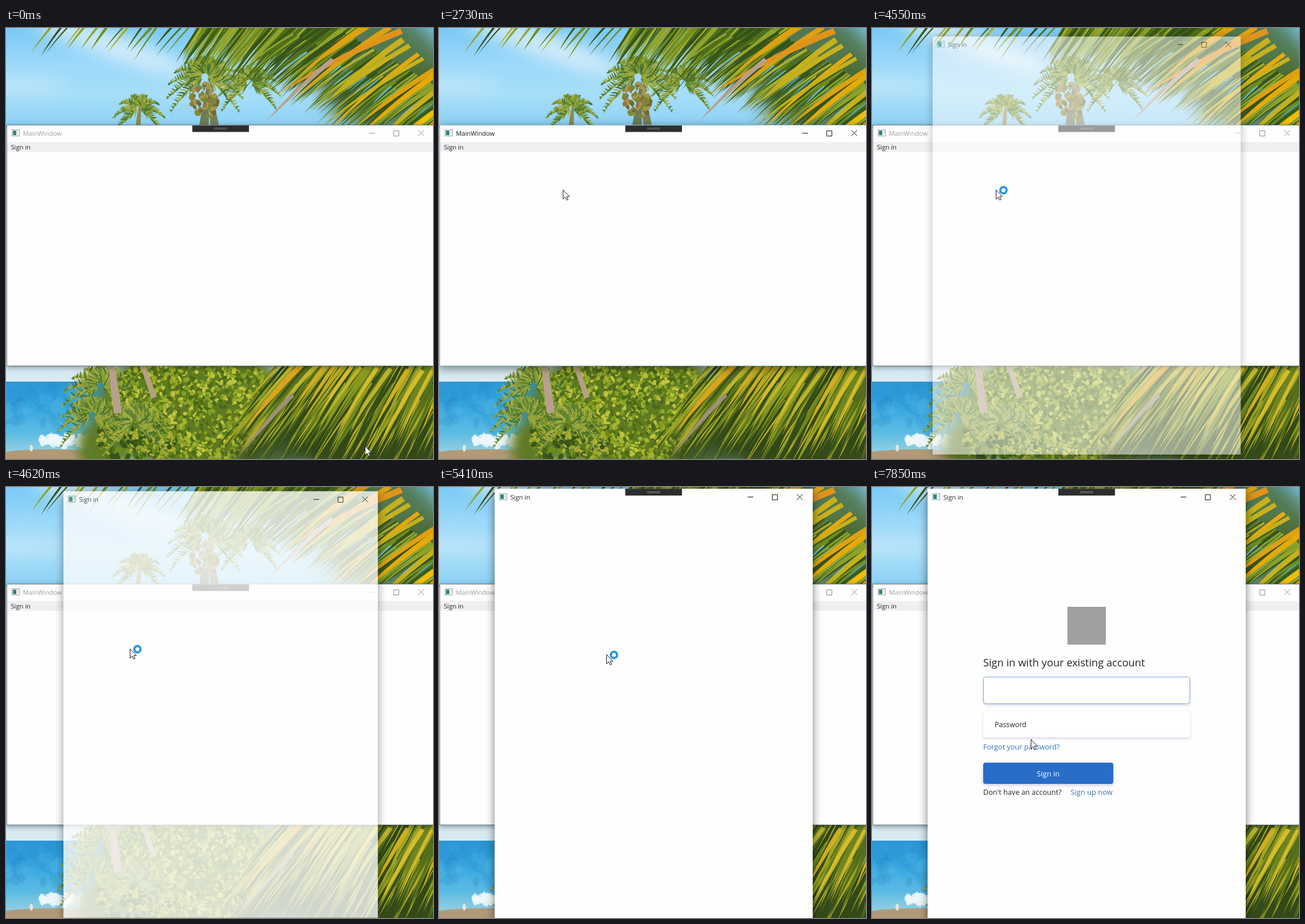
These frames come from a looping animation (745 px wide and 752 px high, 8 s). An HTML page with a canvas:

```html
<!DOCTYPE html>
<html lang="en">
<head>
<meta charset="utf-8">
<title>Sign in</title>
<style>
  html, body { margin: 0; width: 100%; height: 100%; overflow: hidden; background: #fff; }
  canvas, svg { position: absolute; left: 0; top: 0; width: 745px; height: 752px; }
  text { font-family: "Open Sans", "Noto Sans", sans-serif; fill: #262626; }
  .glyph { fill: none; stroke: #111; }
  .bar { fill: #2d2d30; stroke: #424245; }
  #main .title { fill: #9a9d9b; }
  #main .glyph { stroke: #8d8d8d; }
  #main .frame { stroke: #6f858f; filter: drop-shadow(0 2px 4px #0006); }
  #main.active .title { fill: #151515; }
  #main.active .glyph { stroke: #111; }
  #main.active .frame { stroke: #8fb9c9; filter: drop-shadow(0 4px 8px #0007); }
  #dialog .frame { filter: drop-shadow(0 2px 8px #0008); }
  #dialog { transform-origin: 374.5px 379px; }
  .field { fill: #fff; filter: drop-shadow(0 2px 2px #4058b040); }
  .button { fill: #286dc8; filter: drop-shadow(0 2px 3px #4058b050); }
  .caption { fill: #fff; text-anchor: middle; }
  .link { fill: #3576b5; }
</style>
</head>
<body>
<canvas id="photo" width="745" height="752"></canvas>
<svg id="stage" viewBox="0 0 745 752"></svg>
<script>
const LOOP = 8000;
const photo = document.getElementById('photo').getContext('2d');
const stage = document.getElementById('stage');
const mix = (a, b, u) => a + (b - a) * u;

// ---------- beach photo ----------
let seed = 11;
const rand = (a = 0, b = 1) => {
  seed = (seed * 16807) % 2147483647;
  return mix(a, b, seed / 2147483647);
};
const pick = list => list[Math.floor(rand(0, list.length))];

const lush = ['#6f8c1d', '#4c6f1a', '#3a5717', '#8ea32a', '#a9ad2e', '#34521c'];
const hazy = ['#7f9b39', '#5f8433', '#a7ad3f', '#47722f', '#9aa53a'];
const golds = ['#f2bd08', '#e6a90a', '#dfa010', '#c7b01c'];
const bush = ['#a4b42b', '#819c22', '#5b7d1c', '#bfc440', '#92a528', '#486a18', '#55691c'];
const sunlit = ['#8a9a20', '#b9a927', '#566f1b', '#2d4814', '#a2a526', '#6d8420', '#344f1a'];

function gradient(y0, y1, ...colors) {
  const g = photo.createLinearGradient(0, y0, 0, y1);
  colors.forEach((c, i) => g.addColorStop(i / (colors.length - 1), c));
  photo.fillStyle = g;
  photo.fillRect(0, y0, 745, y1 - y0);
}

function dab(x, y, rx, ry, color, turn = 0, blur = 0) {
  photo.filter = blur ? `blur(${blur}px)` : 'none';
  photo.fillStyle = color;
  photo.beginPath();
  photo.ellipse(x, y, rx, ry, turn, 0, 7);
  photo.fill();
  photo.filter = 'none';
}

// small dabs scattered inside an ellipse
function cluster(n, x, y, rx, ry, size, colors) {
  for (let i = 0; i < n; i++) {
    const a = rand(0, 2 * Math.PI), r = Math.sqrt(rand());
    dab(x + rx * r * Math.cos(a), y + ry * r * Math.sin(a),
      size * rand(0.5, 1.2), size * rand(0.3, 0.8), pick(colors), rand(0, 3));
  }
}

// tapered stroke, arched a little upwards
function leaf(x, y, deg, len, width, color) {
  const a = deg * Math.PI / 180, dx = Math.cos(a) * len, dy = Math.sin(a) * len;
  const nx = -Math.sin(a) * width / 2, ny = Math.cos(a) * width / 2;
  const mx = x + dx / 2, my = y + dy / 2 - len * 0.05;
  photo.fillStyle = color;
  photo.beginPath();
  photo.moveTo(x - nx, y - ny);
  photo.quadraticCurveTo(mx - nx, my - ny, x + dx, y + dy);
  photo.quadraticCurveTo(mx + nx, my + ny, x + nx, y + ny);
  photo.fill();
}

// leaves rooted along a line, lean and length blended from one end to the other
function frond(n, from, to, lean, len, width, colors) {
  for (let i = 0; i < n; i++) {
    const u = (i + rand()) / n;
    leaf(mix(...[from[0], to[0]], u), mix(from[1], to[1], u), mix(...lean, u) + rand(-4, 4),
      mix(...len, u) * rand(0.7, 1.1), width * rand(0.6, 1.2), pick(colors));
  }
}

// crown of arching fronds with hanging leaflets
function palm(x, y, r, fronds) {
  for (let i = 0; i < fronds; i++) {
    const deg = mix(155, 385, i / (fronds - 1)), a = deg * Math.PI / 180;
    for (let u = 0.1; u < 1; u += 0.06) {
      const px = x + Math.cos(a) * r * 0.85 * u;
      const py = y + Math.sin(a) * r * 0.85 * u + r * 0.45 * u * u;
      for (const side of [-40, 40])
        leaf(px, py, deg + side + rand(-12, 12), r * 0.28 * (1.15 - u), 3, pick(hazy));
    }
  }
}

function drawTop() {
  gradient(0, 175, '#79c9f6', '#9bd8fa', '#a6def9', '#8bd0f3');
  dab(170, 25, 150, 22, '#e2f2fbcc', 0.35, 14);
  dab(20, 100, 90, 14, '#cdebfbaa', 0, 14);

  leaf(229, 190, 275, 70, 9, '#8c8a52');
  palm(232, 140, 55, 8);
  leaf(338, 260, 275, 170, 22, '#6d7c56');
  leaf(376, 260, 262, 170, 20, '#75805a');
  palm(425, 95, 65, 9);
  palm(347, 85, 80, 12);
  cluster(70, 345, 125, 26, 30, 6, ['#927745', '#6f6a35', '#a8954a', '#7c8a34']);

  frond(15, [70, -8], [340, -8], [128, 128], [70, 80], 4, lush);
  dab(620, 40, 170, 90, '#45642acc', 0.4, 16);
  dab(690, 120, 130, 60, '#45642acc', 0, 16);
  frond(120, [340, -10], [640, -10], [122, 140], [80, 190], 5, lush);
  frond(110, [500, 10], [800, 150], [142, 140], [110, 130], 5, lush);
  frond(40, [520, 40], [790, 150], [142, 140], [50, 50], 4, ['#6cc0e4', '#4fa5c4']);
  frond(60, [560, -10], [800, 130], [142, 142], [160, 160], 5, lush);
  frond(11, [650, -20], [810, 130], [145, 141], [200, 200], 11, golds);
  leaf(690, 5, 153, 245, 11, '#e0931a');
  leaf(570, 55, 137, 160, 8, '#b79f88');
}

function drawBottom() {
  gradient(585, 618, '#cfe5f0', '#dcebf2');
  gradient(617, 752, '#2c97d6', '#35a5df', '#5cbce2', '#a9d7e2');
  cluster(60, 90, 670, 110, 36, 16, ['#5db9e433', '#1e80c433']);
  cluster(60, 112, 720, 55, 9, 9, ['#eef7facc']);
  dab(80, 752, 120, 17, '#b29a78');
  dab(44, 733, 3, 6, '#e7e4dc');

  dab(330, 665, 175, 110, '#5f7a22', 0, 12);
  dab(170, 730, 45, 50, '#5f7a26', 0, 10);
  palm(165, 625, 82, 11);
  palm(150, 675, 72, 10);
  cluster(1500, 330, 660, 150, 100, 5, bush);
  cluster(250, 230, 715, 70, 45, 6, lush);
  palm(225, 690, 80, 11);
  leaf(195, 672, 262, 160, 14, '#b7a08d');
  leaf(258, 645, 250, 130, 10, '#b5a182');

  dab(650, 680, 190, 110, '#34491a', 0, 14);
  dab(480, 725, 90, 45, '#34491acc', -0.6, 12);
  for (const y of [650, 620, 580])
    frond(75, [mix(480, 440, (y - 580) / 70), y], [800, y], [130, 114], [130, 150], 6, sunlit);
  frond(12, [500, 585], [780, 600], [130, 116], [130, 150], 7, ['#d5bd2a', '#cfae20', '#bcb42c']);
  leaf(515, 588, 131, 160, 10, '#dda31c');
  leaf(500, 640, 131, 145, 8, '#9d9078');
}

drawTop();
drawBottom();

// ---------- windows ----------
const label = (x, y, size, text, kind = '') =>
  `<text x="${x}" y="${y}" font-size="${size}" class="${kind}">${text}</text>`;

const titleBar = (x, y, text, closeX) => `
  <g transform="translate(${x} ${y})">
    <rect x=".5" y=".5" width="13" height="11" fill="#f4f7f7" stroke="#9aa8ac"/>
    <rect x="2" y="2" width="6" height="8" fill="#2f857e"/>
    <path d="M10 3h2M10 6h2" stroke="#a9b6ba"/>
    ${label(19.5, 10.5, 11.1, text, 'title')}
  </g>
  <path class="glyph" transform="translate(${closeX} ${y + 6.5})"
    d="M-91 0h10M-48 -4h9v9h-9zM-5 -5l10 10m0 -10l-10 10"/>`;

stage.innerHTML = `
  <g id="main">
    <rect class="frame" x="1.5" y="169.5" width="780" height="420" fill="#fefefe"/>
    ${titleBar(10, 177, 'MainWindow', 724.5)}
    <rect x="2" y="199" width="743" height="17" fill="#f0f0f0"/>
    <rect id="hover" x="2.5" y="199.5" width="46" height="16" fill="#26a0da3d" stroke="#26a0da"/>
    ${label(8.5, 212, 11.1, 'Sign in')}
    <rect class="bar" x="325.5" y="170.5" width="98" height="10.5"/>
    <path d="M363 174.5h23M363 176.5h23" stroke="#6b6b6e"/>
  </g>
  <g id="dialog">
    <rect class="frame" x="97" y="3" width="555" height="753" fill="#fefefe"/>
    ${titleBar(105, 11, 'Sign in', 629.5)}
    <g id="tools">
      <rect class="bar" x="325.5" y="3.5" width="98" height="11"/>
      <rect x="363" y="7" width="23" height="4" fill="#555558"/>
    </g>
    <g id="form">
      <rect x="341" y="209" width="67" height="66" fill="#a0a0a0"/>
      ${label(194, 313, 18.2, 'Sign in with your existing account')}
      <rect class="field" x="194.5" y="331.5" width="360" height="46.5" rx="4" stroke="#86a6e6"/>
      <rect class="field" x="194" y="391" width="361" height="46" rx="4"/>
      ${label(214, 419, 12.3, 'Password')}
      ${label(194, 458, 12.6, 'Forgot your password?', 'link')}
      <rect class="button" x="194" y="481" width="227" height="37" rx="4"/>
      ${label(307.5, 504.5, 12.9, 'Sign in', 'caption')}
      ${label(194, 537, 12.65, "Don't have an account?")}
      ${label(346.5, 537, 12.9, 'Sign up now', 'link')}
    </g>
  </g>
  <g id="cursor">
    <path d="M.5 .5V16.5L4.2 13L6.8 18.3L9.2 17.2L6.7 12H11.5Z" fill="#fff" stroke="#16162a"/>
    <circle id="ring" cx="13.3" cy="1" r="5.4" fill="#fff" stroke="#2d97dc" stroke-width="4"/>
  </g>`;

const el = Object.fromEntries(['main', 'hover', 'dialog', 'tools', 'form', 'cursor', 'ring']
  .map(id => [id, document.getElementById(id)]));

// ---------- motion ----------
const STEP = 77;
const stops = [
  { from: 70, to: 760, x: 28, y: 205 },
  { from: 1170, to: 1470, x: 69, y: 229 },
  { from: 1570, to: 1800, x: 111, y: 235 },
  { from: 2400, to: 2730, x: 216, y: 282 },
  { from: 4780, to: 5170, x: 292, y: 292 },
  { from: 5480, to: 5960, x: 298, y: 381 },
  { from: 6970, to: 7850, x: 277, y: 440 }
];
const smooth = u => u * u * (3 - 2 * u);
const stepped = (t, from, span) => Math.min(1, (Math.floor((t - from) / STEP) + 1) * STEP / span);

function pointer(t) {
  let x = 626, y = 729;
  for (const stop of stops.filter(s => t >= s.from)) {
    const u = t >= stop.to ? 1 : smooth(stepped(t, stop.from, stop.to - stop.from));
    x = mix(x, stop.x, u);
    y = mix(y, stop.y, u);
  }
  return [Math.round(x), Math.round(y)];
}

const show = (node, on) => { node.style.display = on ? '' : 'none'; };

function render(t) {
  const [x, y] = pointer(t);
  el.cursor.setAttribute('transform', `translate(${x} ${y})`);
  show(el.ring, t >= 4290 && t < 5800);
  el.main.classList.toggle('active', t >= 1090 && t < 4290);
  show(el.hover, x < 49 && y >= 199 && y < 216);

  const opened = stepped(t, 4450, 350);
  show(el.dialog, t >= 4450);
  el.dialog.style.opacity = Math.min(1, opened * 1.18);
  el.dialog.style.transform = `scale(${1 - 0.1 * (1 - opened) ** 2})`;
  show(el.tools, t >= 4860);
  show(el.form, t >= 7280);
}

function tick() {
  render(performance.now() % LOOP);
  requestAnimationFrame(tick);
}
tick();
</script>
</body>
</html>
```
